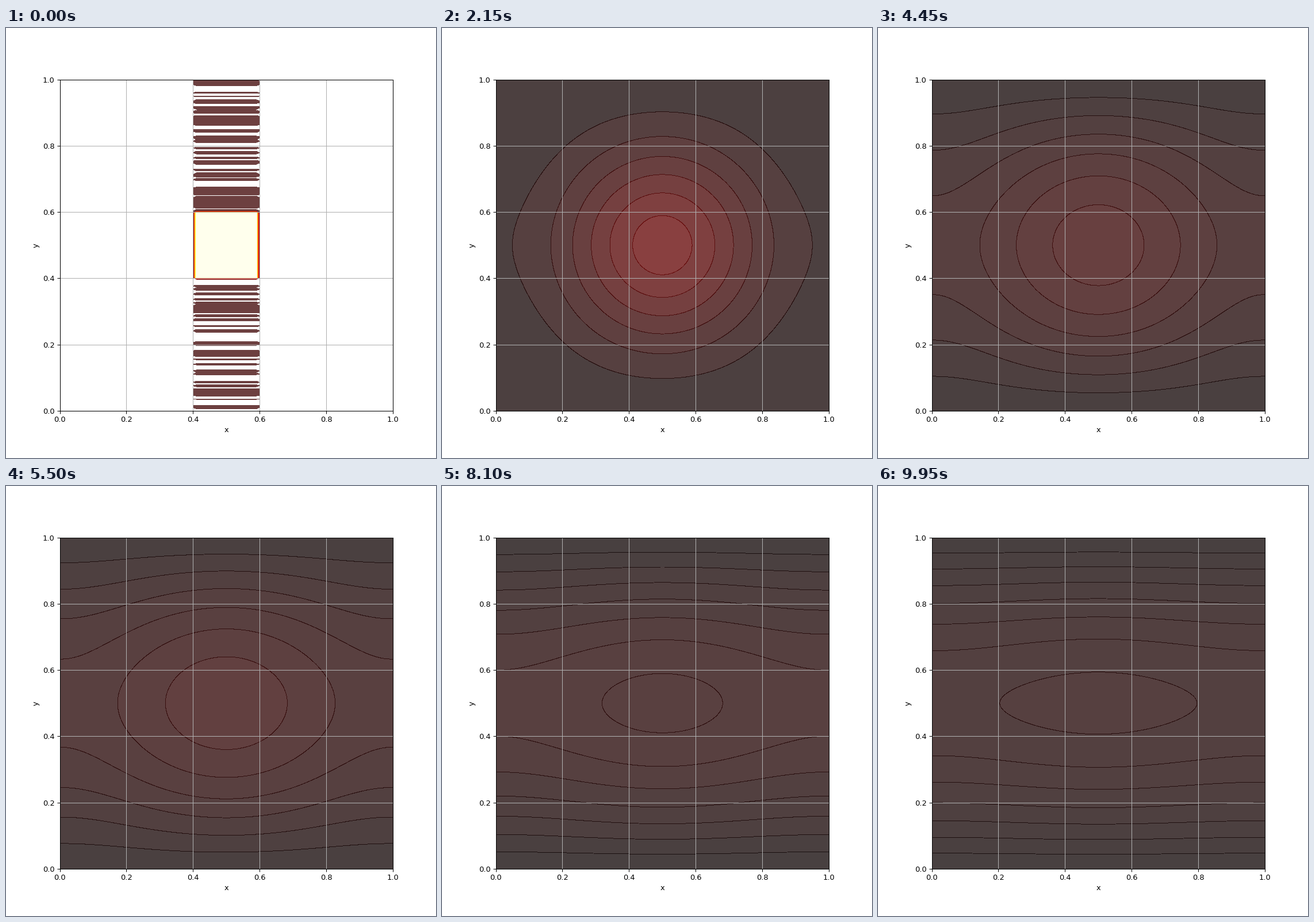
These frames come from a looping animation (748x748 px, 10000 ms). A matplotlib script:

```python
import math

import numpy as np
import matplotlib.pyplot as plt
from matplotlib.animation import FuncAnimation

INCHES, DPI = 8, 93.5
FRAMES, INTERVAL = 200, 50
DX = 0.01
DIFFUSION = 0.0005               # diffusivity times the time between frames
HALF_X, HALF_Y = 0.095, 0.1      # half size of the hot square on the grid
IMAGES = range(-5, 6)

cols = np.linspace(0, 1, 101)
rows = np.linspace(0, 1, 200)
verf = np.vectorize(math.erf)


def spread(d, half, dt):
    """Diffused unit box, at distance d from its centre."""
    w = 2 * math.sqrt(dt)
    return (verf((d + half) / w) - verf((d - half) / w)) / 2


def initial():
    """Hot square with round-off noise above and below it."""
    noise = np.random.default_rng(4).normal(0, 1e-17, rows.size)
    column = np.where(abs(rows - 0.5) < 0.1, 1.0, noise)
    inside = abs(cols - 0.5) < 0.1 - DX / 2
    return np.outer(column, inside.astype(float))


def field(n):
    if n == 0:
        return initial()
    dt = DIFFUSION * n
    # Insulated left and right walls half a cell in, cold bottom and top
    x = np.clip(cols, DX, 1 - DX) - 0.5
    y = rows - 0.5
    across = sum(spread(x - m * (1 - DX), HALF_X, dt) for m in IMAGES)
    up = sum((-1) ** m * spread(y - m, HALF_Y, dt) for m in IMAGES)
    up[0] = up[-1] = 0
    return np.outer(np.maximum(up, 0), np.maximum(across, 0))


fig, ax = plt.subplots(figsize=(INCHES, INCHES), dpi=DPI)
ax.set(xlim=(0, 1), ylim=(0, 1), xlabel="x", ylabel="y")
ax.grid(True)
shown = []


def update(n):
    while shown:
        shown.pop().remove()
    # Overlapping fill edges give the dark contour lines
    shown.append(ax.contourf(cols, rows, field(n), cmap="hot", alpha=0.75,
                             vmin=0, vmax=1))
    return shown


anim = FuncAnimation(fig, update, frames=FRAMES, interval=INTERVAL,
                     repeat=True, repeat_delay=0)
plt.show()
```
